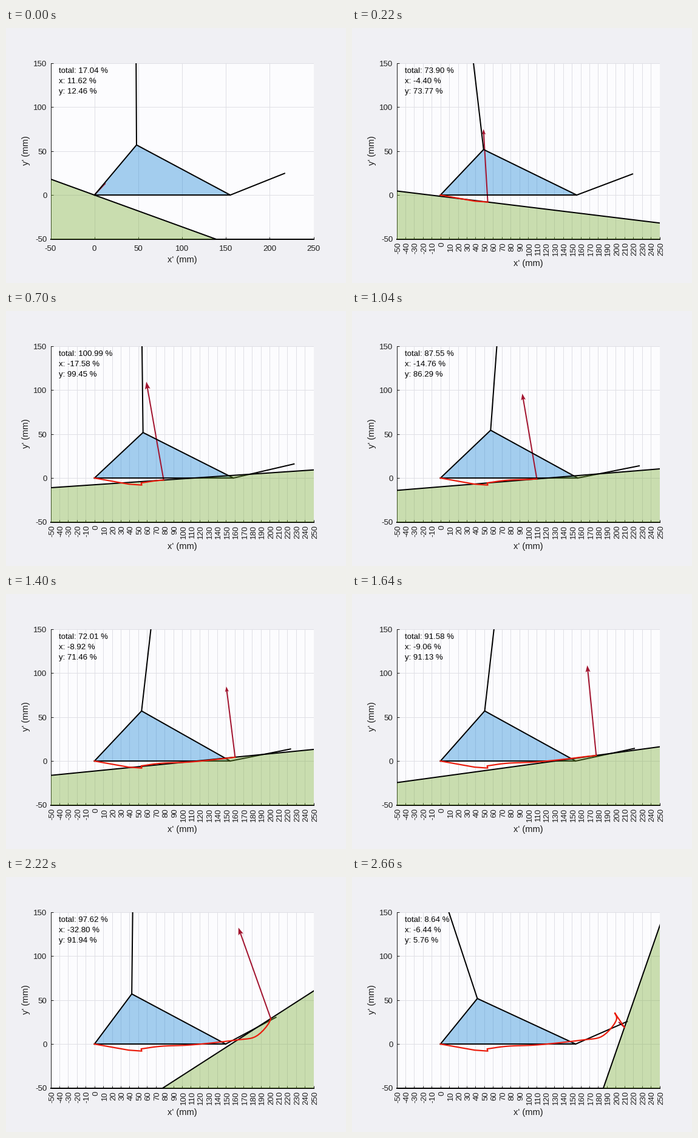
Write a matplotlib script that moves like this. It is 560 px wide and 420 px high and loops after 2760 ms.

```python
import matplotlib.pyplot as plt
import numpy as np
from matplotlib.animation import FuncAnimation

plt.rcParams["font.family"] = "Liberation Sans"

W, H, DPI = 560, 420, 100
PX = 72 / DPI                      # points per pixel
LEFT, RIGHT, TOP, BOTTOM = 73.5, 506.5, 58, 347.5
FORCE_SCALE = 1.125                # mm per percent of body weight
TICK_MS = 20

BACK = "#f0f0f4"
PLOT = "#fcfcfe"
GRID = "#dfdfe5"
INK = "#1c1c1c"
TRACE = "#ea1c0c"
ARROW = "#a2142f"
GROUND = (0.466, 0.674, 0.188, 0.38)
FOOT = (0.08, 0.51, 0.84, 0.38)

# Each pose stays for a long (100 ms) or a short (20 ms) time
HOLDS = "HL" * 5 + "H" + "HLHLHLHLH" * 2 + "LH" * 3 + "HLH" + "HLHH"
SCHEDULE = [i for i, h in enumerate(HOLDS) for _ in range(5 if h == "H" else 1)]
POSES = np.arange(len(HOLDS))


def ramp(start, end):
    """Smooth rise from 0 to 1 between two poses."""
    t = np.clip((POSES - start) / (end - start), 0, 1)
    return t * t * (3 - 2 * t)


def bump(centre, width):
    return np.exp(-((POSES - centre) / width) ** 2)


def through(keys, values):
    """Smooth cubic through a few key values, sampled at every pose."""
    k, v = np.array(keys, float), np.array(values, float)
    m = np.gradient(v, k)
    j = np.clip(np.searchsorted(k, POSES, side="right") - 1, 0, len(k) - 2)
    h = k[j + 1] - k[j]
    t = (POSES - k[j]) / h
    rise = t * t * (3 - 2 * t)
    return (v[j] + rise * (v[j + 1] - v[j])
            + h * t * (1 - t) * ((1 - t) * m[j] - t * m[j + 1]))


# Foot in mm, angles in radians
ankle_x = 47.1 + 10.2 * bump(15.5, 10) - 5 * ramp(29, 36)
ankle_y = 57 - 5.2 * (ramp(0, 3) - ramp(11, 21) + ramp(35, 41))
ball_x = 154.9 + 3.7 * bump(11, 6) - 5.6 * bump(33.5, 5)
toe_length = 67.8 + 3.6 * np.cos(2 * np.pi * (POSES - 15) / 50)
toe_angle = np.radians(21.7 - 10.5 * ramp(0, 15) + 18.5 * bump(37, 6.3))
shank = np.radians(90.3 + 6.5 * ramp(0, 3) - 13.3 * ramp(2, 21) + 33.5 * ramp(31, 46))

# The floor lands flat, then tilts ever faster as the heel lifts
heel_off = np.maximum(POSES - 22, 0)
slope = np.radians(-19.9 + 22 * ramp(0, 5.5) + 0.16 * POSES + 0.053 * heel_off ** 2.4)

# Ground reaction force in percent
STANCE = [0, 3, 11, 22, 29, 35, 41]
force_x = through(STANCE, [11.62, -4.40, -17.58, -8.92, -12.47, -32.80, -6.44])
force_y = through(STANCE, [12.46, 73.77, 99.45, 71.46, 103.45, 91.94, 5.76])

# Centre of pressure: along the heel, then along the sole, then off the toe
SOLE = [4, 11, 16, 22, 29, 35, 38]
cop_x = through(SOLE, [53.3, 79, 110, 160.5, 186.3, 201.2, 199])
cop_y = through(SOLE, [-5.5, -2.3, -1, 4.4, 10, 29, 35.3])
strike = np.arange(4) / 3
cop_x[:4] = 54 * strike ** 0.8
cop_y[:4] = -8 * np.sin(np.pi / 2 * strike)
cop_x[38:] = np.linspace(199, 210, 4)
cop_y[38:] = np.linspace(35.3, 19, 4)

fig = plt.figure(figsize=(W / DPI, H / DPI), dpi=DPI, facecolor=BACK)
ax = fig.add_axes([LEFT / W, 1 - BOTTOM / H, (RIGHT - LEFT) / W, (BOTTOM - TOP) / H],
                  facecolor=PLOT)
ax.set(xlim=(-50, 250), ylim=(-50, 150), yticks=range(-50, 151, 50))
ax.set_axisbelow(True)
ax.grid(True, color=GRID, lw=PX)
ax.tick_params(direction="in", length=4 * PX, width=PX, color=INK,
               labelbottom=False, labelleft=False)
for side in ("top", "right"):
    ax.spines[side].set_visible(False)
ax.spines["left"].set(color=INK, linewidth=PX)
ax.spines["bottom"].set(color="black", linewidth=2 * PX)


def label(x, y, text, size=13.3, **style):
    return fig.text(x / W, 1 - y / H, text, fontsize=size * PX,
                    **{"color": INK, "va": "baseline", **style})


def px_x(v):
    return LEFT + (v + 50) * (RIGHT - LEFT) / 300


def px_y(v):
    return BOTTOM - (v + 50) * (BOTTOM - TOP) / 200


def stroke(color="black", width=2, z=3):
    return ax.plot([], [], color=color, lw=width * PX, zorder=z,
                   solid_joinstyle="round")[0]


def patch(color, z):
    return ax.fill([0, 0, 0], [0, 0, 0], fc=color, lw=0, zorder=z)[0]


def polar(length, angle):
    return length * np.array([np.cos(angle), np.sin(angle)])


def join(line, *points):
    line.set_data(*np.array(points).T)


for v in range(-50, 151, 50):
    label(67.5, px_y(v) + 5, str(v), ha="right")
coarse = [label(px_x(v), 367, str(v), ha="center") for v in range(-50, 251, 50)]
fine = [label(px_x(v) + 2.5, 353, str(v), ha="center", va="top", rotation=90)
        for v in range(-50, 251, 10)]
x_title = label(290, 386, "x' (mm)", 14.6, ha="center")
label(33, 202, "y' (mm)", 14.6, ha="center", va="center", rotation=90)
readout = [label(87, 74.3 + 17 * row, "", color="black") for row in range(3)]

sole = patch(FOOT, 2)
arrow, head = stroke(ARROW, z=2.5), patch(ARROW, 2.5)
outline, leg, toe = stroke(), stroke(), stroke()
ground = patch(GROUND, 4)
surface = stroke(z=5)
trace = stroke(TRACE, 2.2, 6)


def set_ticks(is_fine):
    ax.set_xticks(range(-50, 251, 10 if is_fine else 50))
    for t in coarse:
        t.set_visible(not is_fine)
    for t in fine:
        t.set_visible(is_fine)
    x_title.set_y(1 - (392 if is_fine else 386) / H)


def draw_foot(i):
    heel, ankle = np.zeros(2), np.array([ankle_x[i], ankle_y[i]])
    ball = np.array([ball_x[i], 0])
    sole.set_xy([heel, ankle, ball])
    join(outline, heel, ankle, ball, heel)
    join(leg, ankle, ankle + polar(250, shank[i]))
    join(toe, ball, ball + polar(toe_length[i], toe_angle[i]))


def draw_ground(i, cop):
    reach = polar(600, slope[i])
    down = polar(900, slope[i] - np.pi / 2)
    a, b = cop - reach, cop + reach
    ground.set_xy([a, b, b + down, a + down])
    join(surface, a, b)


def draw_force(i, cop):
    force = np.array([force_x[i], force_y[i]])
    vec = FORCE_SCALE * force
    size = np.hypot(*vec)
    barb = max(0.075 * size, 2.5) * vec / size
    side = 0.36 * np.array([-barb[1], barb[0]])
    tip = cop + vec
    join(arrow, cop, tip - 0.7 * barb)
    head.set_xy([tip, tip - barb + side, tip - 0.8 * barb, tip - barb - side])
    values = (np.hypot(*force), *force)
    for text, name, value in zip(readout, ("total", "x", "y"), values):
        text.set_text(f"{name}: {value:.2f} %")


def update(frame):
    i = SCHEDULE[frame]
    cop = np.array([cop_x[i], cop_y[i]])
    set_ticks(i > 0)
    draw_foot(i)
    draw_ground(i, cop)
    draw_force(i, cop)
    trace.set_data(cop_x[:i + 1], cop_y[:i + 1])
    return []


anim = FuncAnimation(fig, update, frames=len(SCHEDULE), interval=TICK_MS,
                     init_func=lambda: update(0), repeat=True, repeat_delay=0)
plt.show()
```
